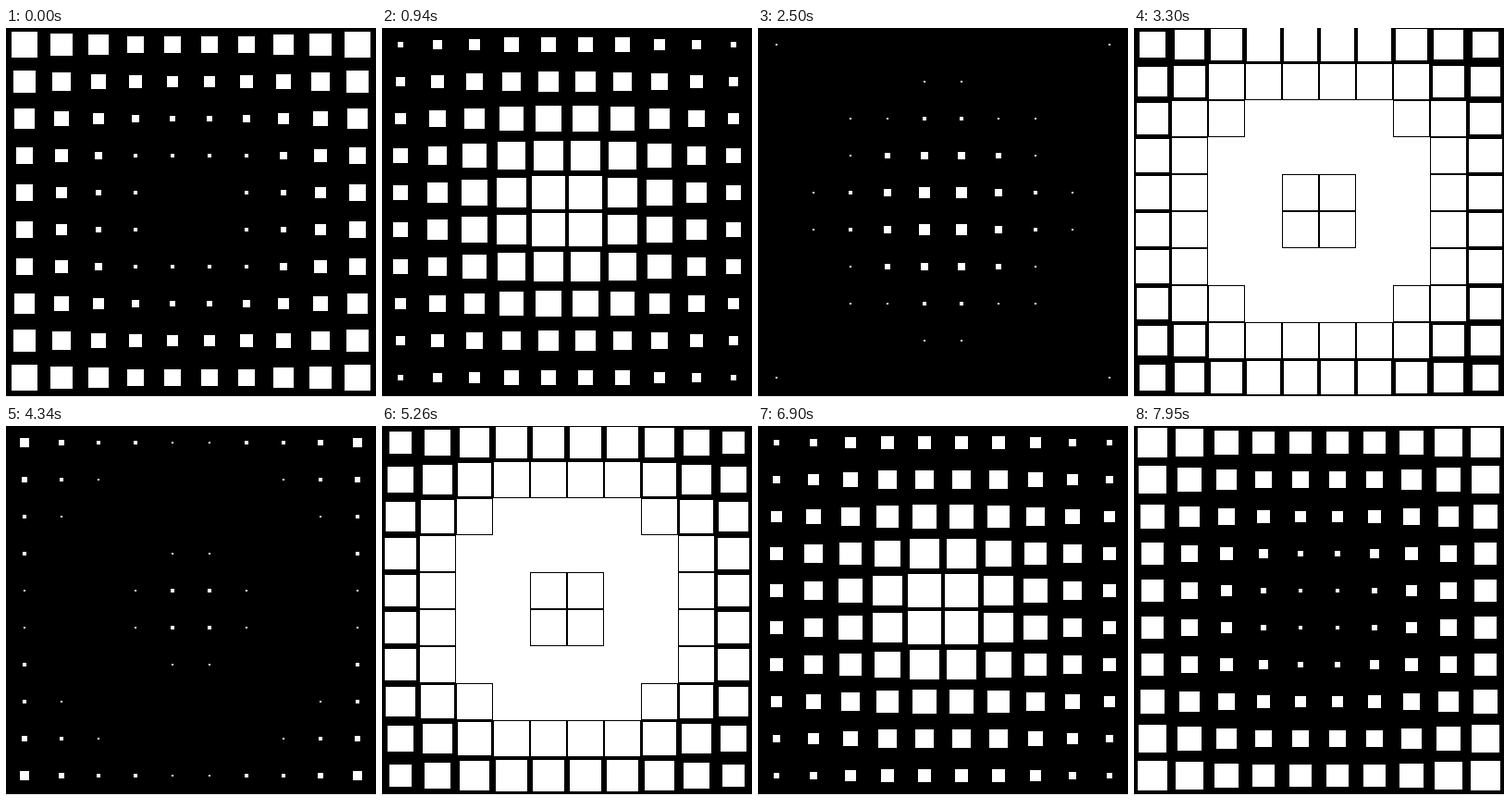
These frames come from a looping animation (400 px wide and 400 px high, 8000 ms). An HTML page with a canvas:

```html
<!DOCTYPE html>
<html lang="en">
<head>
<meta charset="utf-8">
<title>Ripple of squares</title>
<style>
  html, body { margin: 0; width: 100%; height: 100%; overflow: hidden; background: #fff; }
  canvas { display: block; width: 100vw; height: 100vh; object-fit: contain; }
</style>
</head>
<body>
<canvas id="stage" width="400" height="400"></canvas>
<script>
const ctx = document.getElementById('stage').getContext('2d');

const LOOP = 8000;
const STEPS = 140;
const COUNT = 10;
const CELL = 40;
const TOP = -2;

// Phases in radians
const START_PHASE = 0.083;
const PER_CELL = 0.299;  // per cell of distance from the middle
const PER_STEP = 0.1766; // outward travel of the ripple
const SPEED_UP = 0.00365; // extra travel per step in the later part
const SPEED_UP_FROM = 57;

function phaseAt(time) {
  const step = Math.min(STEPS - 1, Math.round(time / LOOP * STEPS));
  return START_PHASE - PER_STEP * step - SPEED_UP * Math.max(0, step - SPEED_UP_FROM);
}

function draw(time) {
  const phase = phaseAt(time);
  const middle = (COUNT - 1) / 2;

  ctx.fillStyle = '#fff';
  ctx.fillRect(0, 0, 400, 400);
  ctx.fillStyle = '#000';
  ctx.fillRect(0, 0, 400, 400 + TOP);
  ctx.fillStyle = '#fff';
  for (let row = 0; row < COUNT; row++) {
    for (let col = 0; col < COUNT; col++) {
      const distance = Math.hypot(col - middle, row - middle);
      const half = Math.round(CELL / 4 * (1 - Math.cos(phase + PER_CELL * distance)));
      const x = (col + 0.5) * CELL;
      const y = (row + 0.5) * CELL + TOP;
      ctx.fillRect(x - half, y - half, half * 2, half * 2);
    }
  }
}

const start = performance.now();
function tick() {
  draw((performance.now() - start) % LOOP);
  requestAnimationFrame(tick);
}
tick();
</script>
</body>
</html>
```
